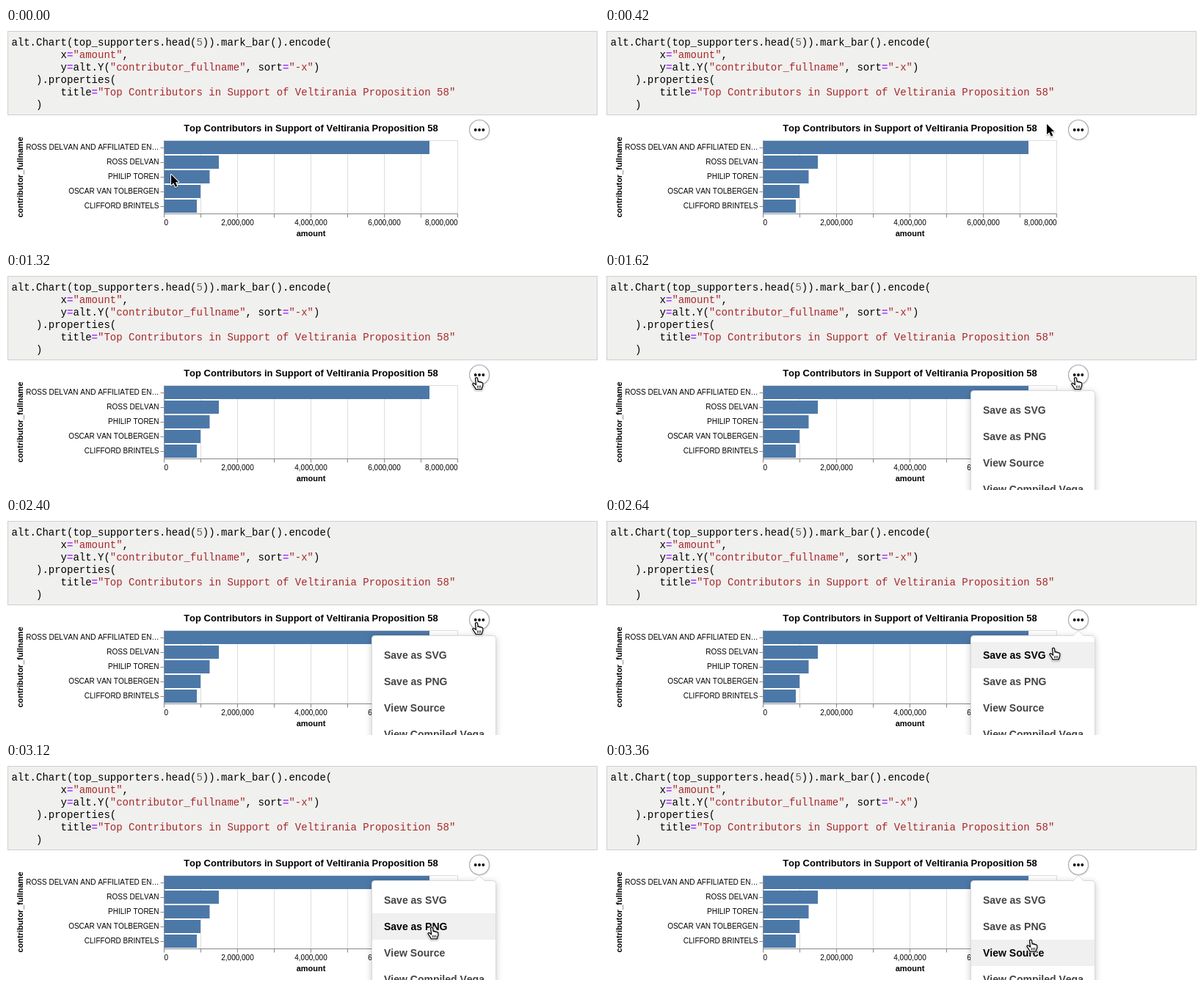
An HTML page with a canvas that plays this animation: 808 px wide and 296 px high, repeating every 3420 ms.

```html
<!DOCTYPE html>
<html lang="en">
<head>
<meta charset="utf-8">
<title>Chart menu</title>
<style>
html, body { margin: 0; width: 808px; height: 296px; overflow: hidden; background: #fff; }
canvas { display: block; }
</style>
</head>
<body>
<canvas id="stage" width="808" height="296"></canvas>
<script>
const ctx = document.getElementById("stage").getContext("2d");
const LOOP = 3420, STEP = 60, MENU_OPEN = 1320, MENU_GROW = 150;
const SANS = '"Liberation Sans", Arial, sans-serif';
const MONO = '"Liberation Mono", "Courier New", monospace';
const TITLE = "Top Contributors in Support of Veltirania Proposition 58";
ctx.fontKerning = "none";

const code = [
  "alt.Chart(top_supporters.head(5)).mark_bar().encode(",
  '        x="amount",',
  '        y=alt.Y("contributor_fullname", sort="-x")',
  "    ).properties(",
  `        title="${TITLE}"`,
  "    )"
];

const bars = [
  ["ROSS DELVAN AND AFFILIATED EN…", 362],
  ["ROSS DELVAN", 75],
  ["PHILIP TOREN", 62.5],
  ["OSCAR VAN TOLBERGEN", 50],
  ["CLIFFORD BRINTELS", 45]
];

const plot = { x: 215, y: 153, w: 400, h: 100 };
const button = { x: 645, y: 139, r: 13.5 };
const menu = { x: 498, y: 160, w: 170, h: 197, top: 169, row: 36 };
const items = ["Save as SVG", "Save as PNG", "View Source", "View Compiled Vega"];

// time, x, y of the pointer tip
const path = [
  [0, 225, 200], [210, 430, 160], [420, 602, 131], [540, 629, 134], [720, 641, 143],
  [2430, 641, 143], [2670, 607, 182], [2940, 584, 204.8], [3360, 580, 241.5]
];

function text(str, x, y, font, color = "#000", align = "left") {
  ctx.font = font;
  ctx.fillStyle = color;
  ctx.textAlign = align;
  ctx.fillText(str, x, y);
}

function line(x1, y1, x2, y2, color) {
  ctx.strokeStyle = color;
  ctx.lineWidth = 1;
  ctx.beginPath();
  ctx.moveTo(x1 + 0.5, y1 + 0.5);
  ctx.lineTo(x2 + 0.5, y2 + 0.5);
  ctx.stroke();
}

function box(x, y, w, h, fill, stroke) {
  ctx.fillStyle = fill;
  ctx.fillRect(x, y, w, h);
  if (!stroke) return;
  ctx.strokeStyle = stroke;
  ctx.lineWidth = 1;
  ctx.strokeRect(x + 0.5, y + 0.5, w - 1, h - 1);
}

function tokenColor(part) {
  if (part[0] === '"') return "#a82828";
  if (part === "=") return "#aa44ff";
  return /\d/.test(part) ? "#666" : "#000";
}

function drawCode() {
  box(2, 4, 804, 115, "#f0f0ef", "#cfcfcf");
  code.forEach((row, i) => {
    for (const { 0: part, index } of row.matchAll(/"[^"]*"|=|\d|[^"=\d]+/g)) {
      const weight = part === "=" ? "bold " : "";
      text(part, 7.4 + index * 8.4, 24 + i * 17, `${weight}14px ${MONO}`, tokenColor(part));
    }
  });
}

function drawChart() {
  const { x, y, w, h } = plot;
  const right = x + w, bottom = y + h;
  const label = `10px ${SANS}`, axisTitle = `bold 11px ${SANS}`;
  line(x, y, right, y, "#ddd");
  for (let i = 0; i <= 8; i++) {
    line(x + i * 50, y, x + i * 50, bottom, "#ddd");
    line(x + i * 50, bottom, x + i * 50, bottom + 5, "#888");
  }
  bars.forEach(([name, width], i) => {
    const top = y + i * 20;
    box(x, top + 1, width, 18, "#4c78a8");
    line(x - 5, top + 10, x, top + 10, "#888");
    text(name, x - 6.5, top + 13, label, "#000", "right");
  });
  line(x, bottom, right, bottom, "#888");
  line(x, y, x, bottom, "#888");

  text("0", x + 0.5, 269, label);
  for (let i = 2; i <= 6; i += 2) text(`${i},000,000`, x + i * 50 + 0.5, 269, label, "#000", "center");
  text("8,000,000", right + 0.5, 269, label, "#000", "right");
  text("amount", x + w / 2 + 0.5, 284, axisTitle, "#000", "center");
  text(TITLE, x + w / 2 + 0.5, 141, `bold 13px ${SANS}`, "#000", "center");

  ctx.save();
  ctx.translate(23, y + h / 2 + 0.5);
  ctx.rotate(-Math.PI / 2);
  text("contributor_fullname", 0, 0, axisTitle, "#000", "center");
  ctx.restore();
}

function dot(x, y, r) {
  ctx.beginPath();
  ctx.arc(x, y, r, 0, Math.PI * 2);
}

function drawButton() {
  ctx.save();
  ctx.shadowColor = "rgba(0,0,0,.12)";
  ctx.shadowBlur = 3;
  ctx.shadowOffsetX = ctx.shadowOffsetY = 1;
  ctx.fillStyle = "#fff";
  dot(button.x, button.y, button.r);
  ctx.fill();
  ctx.restore();
  ctx.strokeStyle = "#aaaab2";
  ctx.lineWidth = 1.2;
  ctx.stroke();
  ctx.fillStyle = "#000";
  for (const dx of [-5.3, 0, 5.3]) {
    dot(button.x + dx, button.y, 1.9);
    ctx.fill();
  }
}

function caret(halfWidth, color) {
  ctx.fillStyle = color;
  ctx.beginPath();
  ctx.moveTo(button.x - halfWidth, menu.y + 1);
  ctx.lineTo(button.x, menu.y + 1 - halfWidth);
  ctx.lineTo(button.x + halfWidth, menu.y + 1);
  ctx.fill();
}

function drawMenu(age, hover) {
  if (age <= 0) return;
  const p = Math.min(1, age / MENU_GROW), q = p - 1;
  const scale = 0.6 + 0.4 * (1 + 2.7 * q ** 3 + 1.7 * q * q);
  const cx = menu.x + menu.w / 2, cy = menu.y + menu.h / 2;
  ctx.save();
  ctx.globalAlpha = Math.min(1, p * 2);
  ctx.translate(cx, cy);
  ctx.scale(scale, scale);
  ctx.translate(-cx, -cy);

  ctx.save();
  ctx.shadowColor = "rgba(0,0,0,.24)";
  ctx.shadowBlur = 10;
  ctx.shadowOffsetY = 2;
  ctx.fillStyle = "#fff";
  ctx.beginPath();
  ctx.roundRect(menu.x + 0.5, menu.y + 0.5, menu.w - 1, menu.h - 1, 4);
  ctx.fill();
  ctx.restore();
  ctx.strokeStyle = "#d9d9d9";
  ctx.lineWidth = 1;
  ctx.stroke();
  caret(8, "#d9d9d9");
  caret(7, "#fff");

  items.forEach((name, i) => {
    const top = menu.top + i * menu.row;
    if (i === hover) box(menu.x + 1, top, menu.w - 2, menu.row, "#f0f0f0");
    text(name, menu.x + 17, top + 23, `bold 14px ${SANS}`, i === hover ? "#000" : "#444448");
  });
  ctx.restore();
}

const arrow = new Path2D("M0 0V14.2L3.3 11.2L5.8 16.8L8.3 15.7L5.9 10.2H10.3Z");
const hand = new Path2D(
  "M-1.5 1C-1.5-.8 1.3-.8 1.5 1L2.2 5.6C2.6 4.6 4.2 4.7 4.5 6C5 5.2 6.5 5.4 6.8 6.6" +
  "C7.5 6 8.8 6.5 8.8 7.8V10.5C8.8 12.2 7.5 13 7.3 15.6H-1C-1.5 13.3-3.2 12-4.8 9.4" +
  "C-6 7.6-4.2 6.5-2.8 7.8L-.5 9.6Z");
const knuckles = new Path2D("M1.5 10.6V13.8M3.6 10.5V13.8M5.7 10.5V13.8");

function drawPointer(x, y, isHand) {
  ctx.save();
  ctx.translate(x, y);
  ctx.lineJoin = "round";
  const shape = isHand ? hand : arrow;
  ctx.shadowColor = "rgba(0,0,0,.3)";
  ctx.shadowBlur = 2;
  ctx.shadowOffsetY = 1;
  ctx.strokeStyle = "#fff";
  ctx.lineWidth = isHand ? 3 : 2;
  ctx.stroke(shape);
  ctx.shadowColor = "transparent";
  ctx.fillStyle = isHand ? "#fff" : "#000";
  ctx.fill(shape);
  if (isHand) {
    ctx.strokeStyle = "#000";
    ctx.lineWidth = 1.3;
    ctx.stroke(shape);
    ctx.lineWidth = 0.9;
    ctx.stroke(knuckles);
  }
  ctx.restore();
}

// Smooth curve through the path; the pointer rests at both ends of the pause.
function slope(i, axis) {
  if (i === 0 || i === 4 || i === 5 || i === path.length - 1) return 0;
  const a = path[i - 1], b = path[i + 1];
  return (b[axis] - a[axis]) / (b[0] - a[0]);
}

function pointerAt(t) {
  let i = 0;
  while (i < path.length - 2 && t >= path[i + 1][0]) i++;
  const a = path[i], b = path[i + 1], d = b[0] - a[0];
  const u = Math.min(1, (t - a[0]) / d);
  return [1, 2].map(axis =>
    a[axis] + (b[axis] - a[axis]) * u * u * (3 - 2 * u) +
    d * u * (1 - u) * (slope(i, axis) * (1 - u) - slope(i + 1, axis) * u));
}

function draw(now) {
  const t = Math.floor(now % LOOP / STEP) * STEP;
  const [x, y] = pointerAt(t);
  const inMenu = t >= MENU_OPEN && x > menu.x && x < menu.x + menu.w && y >= menu.top;
  const hover = inMenu ? Math.floor((y - menu.top) / menu.row) : -1;
  const onButton = Math.hypot(x - button.x, y - button.y) < button.r;

  box(0, 0, 808, 296, "#fff");
  drawCode();
  drawChart();
  drawMenu(t - MENU_OPEN, hover);
  drawButton();
  drawPointer(x, y, onButton || hover >= 0);
}

function tick() {
  draw(performance.now());
  requestAnimationFrame(tick);
}
tick();
</script>
</body>
</html>
```
